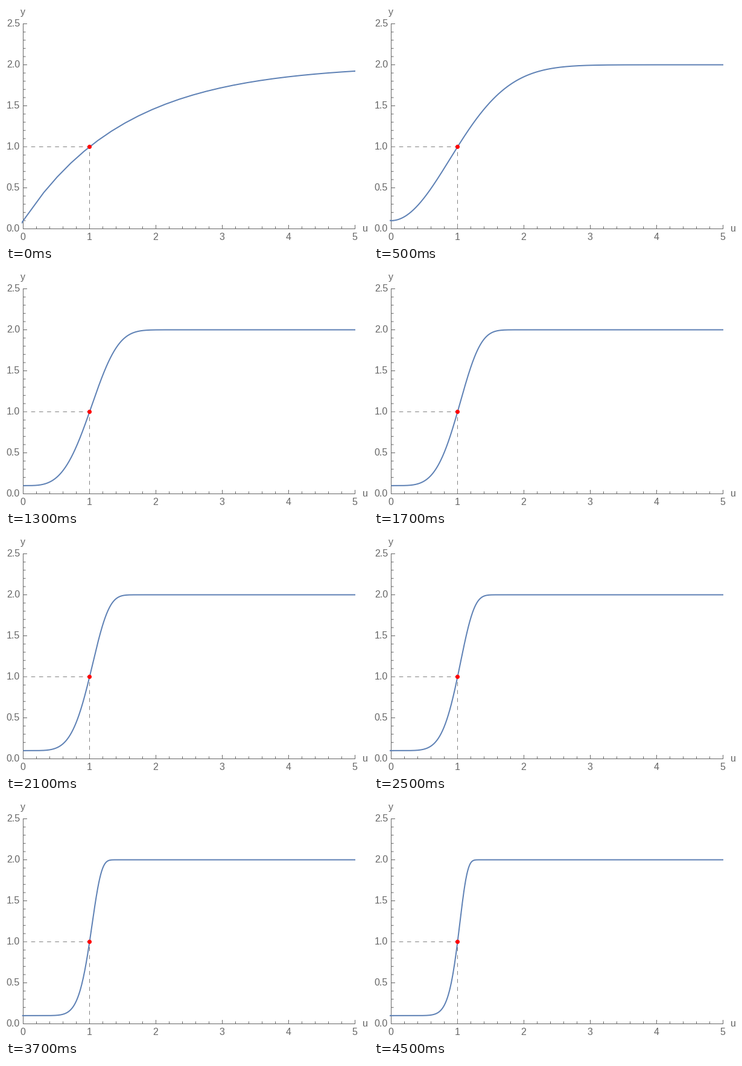
A matplotlib script that plays this animation: 600 px wide and 393 px high, repeating every 4.6 s.

```python
import numpy as np
import matplotlib.pyplot as plt
from matplotlib.animation import FuncAnimation
from matplotlib.patches import Circle, Rectangle

W, H, DPI = 600, 393, 100
FRAMES, INTERVAL = 46, 100
PT = 72 / DPI
GRAY, BLUE, RED = "#666666", "#5e81b5", "#ff0000"
RATE = np.log(1.9)  # makes every curve pass through (1, 1)

plt.rcParams["font.family"] = "Liberation Sans"
fig = plt.figure(figsize=(W / DPI, H / DPI), dpi=DPI, facecolor="white")
ax = fig.add_axes([0, 0, 1, 1])
ax.set(xlim=(0, W), ylim=(H, 0))
ax.axis("off")


def px(u):
    return 28.5 + 110 * u


def py(y):
    return 369.5 - 136 * y


def line(xs, ys, color=GRAY, width=1, **kw):
    return ax.plot(xs, ys, color=color, lw=width * PT, snap=False,
                   solid_capstyle="butt", **kw)[0]


def label(x, y, text, ha="center"):
    ax.text(x, y, text, ha=ha, va="baseline", size=16 * PT, color=GRAY)


def draw_axes():
    line([28, 579], [py(0)] * 2)
    line([px(0)] * 2, [29, 370])
    for i in range(26):
        major = i % 5 == 0
        size = 6.5 if major else 4
        x, y = px(i / 5), py(i / 10)
        line([x, x], [py(0), py(0) - size])
        line([px(0), px(0) + size], [y, y])
        if major:
            label(x - 0.5, 388.5, str(i // 5))
            label(23, y + 4.5, f"{i / 10:.1f}", ha="right")
    label(595.3, 374.3, "u")
    label(27.7, 14.5, "y")


def curve_points(p):
    if p == 1:
        # the flattest curve is sampled coarsely
        u = np.append([-0.1, 0], np.arange(0.309, 5.3, 0.204))
    else:
        # negative u is only real for whole powers or vanishing values
        reach = 0.1 if p == int(p) else min(0.1, 1e-15 ** (1 / p))
        u = np.append([-reach, -reach / 2], np.linspace(0, 5.1, 700))
    power = np.sign(u) ** int(p) * np.abs(u) ** p
    return px(u), py(2 - 1.9 * np.exp(-RATE * power))


draw_axes()
line([px(0), px(1), px(1)], [py(1), py(1), py(0)], "#808080",
     dashes=(6.6, 6.6), dash_capstyle="butt", zorder=2)
curve = line([], [], BLUE, 2, zorder=3)
curve.set_clip_path(Rectangle((26, 0), 553, H, transform=ax.transData))
ax.add_patch(Circle((px(1), py(1)), 3.5, color=RED, lw=0, zorder=4))


def update(i):
    curve.set_data(*curve_points(round(1 + 0.2 * i, 1)))
    return [curve]


anim = FuncAnimation(fig, update, frames=FRAMES, interval=INTERVAL,
                     repeat=True, repeat_delay=0)
plt.show()
```
